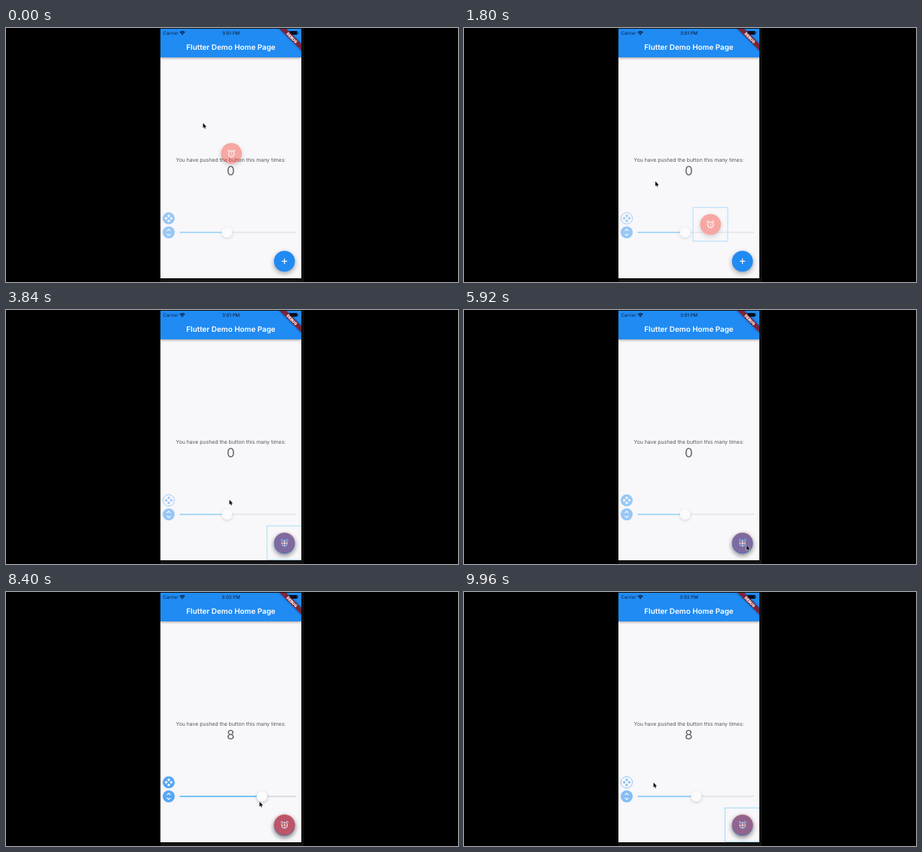
Recreate the animation shown at these times as an HTML page with a canvas. Size 600 by 338 pixels, loop 10000 ms.

```html
<!DOCTYPE html>
<html lang="en">
<head>
<meta charset="utf-8">
<title>Counter demo</title>
<style>
  html, body { margin: 0; width: 100%; height: 100%; overflow: hidden; background: #000; }
  canvas { display: block; width: 600px; height: 338px; }
</style>
</head>
<body>
<canvas id="stage"></canvas>
<script>
const LOOP = 10000;
const W = 600, H = 338, TAU = Math.PI * 2;
const BLUE = '#208bf3', RED = '#f44336', PAPER = '#f8f7fa';
const FONT = 'Inter, Roboto, sans-serif';
const SCREEN = { x: 205, y: 1, w: 187, h: 332 };
const FAB = { x: 369.6, y: 310.4, r: 13.9 };
const TRACK = { x0: 230.5, x1: 385, y: 272 };

const dpr = window.devicePixelRatio || 1;

function setup(canvas) {
  canvas.width = W * dpr;
  canvas.height = H * dpr;
  const c = canvas.getContext('2d');
  c.scale(dpr, dpr);
  c.textRendering = 'geometricPrecision';
  return c;
}

const page = setup(document.getElementById('stage'));
const overlay = setup(document.createElement('canvas'));
let ctx = page;

// The pointer visits a few places: travel time, rest time, place
const TOGGLE = [216, 252];
const START = [261.5, 126.5];
const VISITS = [
  [520, 180, TOGGLE],
  [420, 120, [226, 109.7]],
  [560, 0, [254, 204]],
  [1760, 860, [296.5, 252.5]],
  [530, 250, TOGGLE],
  [560, 980, [375, 313]],
  [340, 0, [252.5, 262]],
  [400, 120, [290.2, 274]],
  [800, 0, [336.5, 279]],
  [500, 150, [305, 277]],
  [390, 180, TOGGLE],
  [300, 80, [251.5, 253.5]]
];
const DRAG = { from: 1240, to: 3560, dx: 73.2, dy: 57.3 };
const SLIDE = { from: 7600, to: 8900, dx: 3.3 };

const clamp = (v, lo, hi) => Math.max(lo, Math.min(hi, v));

function pointerAt(t) {
  let place = START;
  for (const [travel, rest, next] of VISITS) {
    if (t < travel) {
      const u = t / travel, e = u * u * (3 - 2 * u);
      return place.map((v, i) => v + (next[i] - v) * e);
    }
    t -= travel + rest;
    place = next;
    if (t < 0) break;
  }
  return place;
}

function shadow(color, blur, dy) {
  ctx.shadowColor = color;
  ctx.shadowBlur = blur * dpr;
  ctx.shadowOffsetY = dy * dpr;
}

function shaded(color, blur, dy, draw) {
  ctx.save();
  shadow(color, blur, dy);
  draw();
  ctx.restore();
}

// Draws a group of shapes, then lays it on the page with one opacity
function group(alpha, draw) {
  ctx = overlay;
  ctx.clearRect(0, 0, W, H);
  draw();
  ctx = page;
  ctx.globalAlpha = alpha;
  ctx.drawImage(overlay.canvas, 0, 0, W, H);
  ctx.globalAlpha = 1;
}

function disc(x, y, r, color) {
  ctx.fillStyle = color;
  ctx.beginPath();
  ctx.arc(x, y, r, 0, TAU);
  ctx.fill();
}

function arc(x, y, r, color, width, from = 0, to = TAU) {
  ctx.strokeStyle = color;
  ctx.lineWidth = width;
  ctx.beginPath();
  ctx.arc(x, y, r, from, to);
  ctx.stroke();
}

function path(points, closed) {
  ctx.beginPath();
  points.forEach(([x, y]) => ctx.lineTo(x, y));
  if (closed) ctx.closePath();
}

function line(points, color, width) {
  ctx.strokeStyle = color;
  ctx.lineWidth = width;
  path(points);
  ctx.stroke();
}

function label(str, x, y, size, color, weight = 400, align = 'center') {
  ctx.font = `${weight} ${size}px ${FONT}`;
  ctx.textAlign = align;
  ctx.fillStyle = color;
  ctx.fillText(str, x, y);
}

function drawHeader(t) {
  shaded('rgba(0,0,0,.4)', 3, 1, () => {
    ctx.fillStyle = BLUE;
    ctx.fillRect(SCREEN.x, SCREEN.y, SCREEN.w, 38);
  });

  const ink = 'rgba(8,20,45,.85)';
  label('Carrier', 208.5, 9, 6.1, ink, 400, 'left');
  label(t < 7600 ? '3:01 PM' : '3:02 PM', 298.5, 9, 6.1, ink, 500);
  for (let r = 1.6; r < 5; r += 1.55) {
    arc(234, 9.3, r, ink, 1.1, -Math.PI * .76, -Math.PI * .24);
  }
  disc(234, 8.8, .7, ink);
  ctx.fillStyle = '#081020';
  ctx.fillRect(376.5, 4, 10, 5);
  ctx.fillRect(387, 5.5, .8, 2);

  label('Flutter Demo Home Page', 298.5, 28.8, 9.9, '#fff', 600);
}

function drawBanner() {
  ctx.save();
  ctx.translate(379.5, 13);
  ctx.rotate(Math.PI / 4);
  shaded('rgba(0,0,0,.5)', 3, 0, () => {
    ctx.fillStyle = '#7d2439';
    ctx.fillRect(-24, -3, 48, 6);
  });
  label('DEBUG', 0, 1.9, 5.1, '#fff', 900);
  ctx.restore();
}

function drawFab() {
  const { x, y, r } = FAB;
  shaded('rgba(0,0,0,.36)', 6, 2.5, () => disc(x, y, r, BLUE));
  line([[x - 3.6, y], [x + 3.6, y]], '#fff', 1.2);
  line([[x, y - 3.6], [x, y + 3.6]], '#fff', 1.2);
}

function drawAlarm(x, y) {
  ctx.save();
  ctx.translate(x, y);
  arc(0, .5, 3.8, '#fff', 1.2);
  line([[0, -1.7], [0, .9], [1.8, 1.9]], '#fff', .9);
  for (const s of [-1, 1]) line([[s * 5, -2.9], [s * 2.6, -4.9]], '#fff', 1.2);
  ctx.restore();
}

function drawWidget(x, y, moving) {
  shaded('rgba(0,0,0,.36)', 6, 2.5, () => disc(x, y, FAB.r, RED));
  drawAlarm(x, y);
  if (!moving) return;
  ctx.strokeStyle = '#4fbdf6';
  ctx.lineWidth = 1;
  ctx.strokeRect(x - 23.2, y - 22.5, 46, 45);
}

function drawMoveIcon(x, y, color) {
  ctx.fillStyle = color;
  for (let i = 0; i < 4; i++) {
    ctx.save();
    ctx.translate(x, y);
    ctx.rotate(i * Math.PI / 2);
    path([[0, -5.4], [2, -3.4], [0, -1.4], [-2, -3.4]], true);
    ctx.fill();
    ctx.restore();
  }
}

function drawTools(moving) {
  const x = 216, top = 253.3, low = 272;
  if (moving) arc(x, top, 7.6, BLUE, .9);
  else disc(x, top, 8, BLUE);
  drawMoveIcon(x, top, moving ? BLUE : '#fff');
  disc(x, low, 8, BLUE);
  for (const s of [-1, 1]) {
    line([[x - 2.4, low + s * 1.9], [x, low + s * 4.2], [x + 2.4, low + s * 1.9]], '#fff', 1.2);
  }
}

function drawSlider(x) {
  const { x0, x1, y } = TRACK;
  line([[x, y], [x1, y]], '#c6ced6', 1.3);
  line([[x0, y], [x, y]], '#0c9cf5', 1.5);
  shaded('rgba(0,0,0,.32)', 4, 1.2, () => disc(x, y, 7, '#fff'));
}

function drawPointer([x, y]) {
  ctx.save();
  ctx.translate(x, y);
  path([[0, 0], [0, 6.6], [1.5, 5.3], [2.5, 7.6], [3.6, 7.1], [2.6, 4.9], [4.6, 4.7]], true);
  ctx.lineJoin = 'round';
  ctx.strokeStyle = 'rgba(255,255,255,.9)';
  ctx.lineWidth = 1;
  ctx.stroke();
  ctx.fillStyle = '#111';
  ctx.fill();
  ctx.restore();
}

function render(t) {
  const thumb = pointerAt(clamp(t, SLIDE.from, SLIDE.to))[0] + SLIDE.dx;
  const [dragX, dragY] = pointerAt(clamp(t, DRAG.from, DRAG.to));
  const alpha = (thumb - TRACK.x0) / (TRACK.x1 - TRACK.x0) + .03;
  const moving = (t >= 600 && t < 5080) || t >= 9520;
  const count = clamp(Math.floor((t - 5960) / 100) + 1, 0, 8);

  ctx.fillStyle = '#000';
  ctx.fillRect(0, 0, W, H);
  ctx.fillStyle = '#121212';
  ctx.fillRect(205, 0, 190.5, H);

  ctx.save();
  ctx.beginPath();
  ctx.rect(SCREEN.x, SCREEN.y, SCREEN.w, SCREEN.h);
  ctx.clip();
  ctx.fillStyle = PAPER;
  ctx.fillRect(SCREEN.x, SCREEN.y, SCREEN.w, SCREEN.h);
  label('You have pushed the button this many times:', 298.5, 178, 6.9, 'rgba(0,0,0,.66)');
  label(count, 298.3, 196.2, 17, 'rgba(0,0,0,.6)');
  drawHeader(t);
  drawFab();
  group(alpha, () => {
    drawSlider(thumb);
    drawTools(moving);
    drawWidget(dragX + DRAG.dx, dragY + DRAG.dy, moving);
  });
  drawBanner();
  drawPointer(pointerAt(t));
  ctx.restore();
}

const start = performance.now();
function tick() {
  render((performance.now() - start) % LOOP);
  requestAnimationFrame(tick);
}
tick();
</script>
</body>
</html>
```
